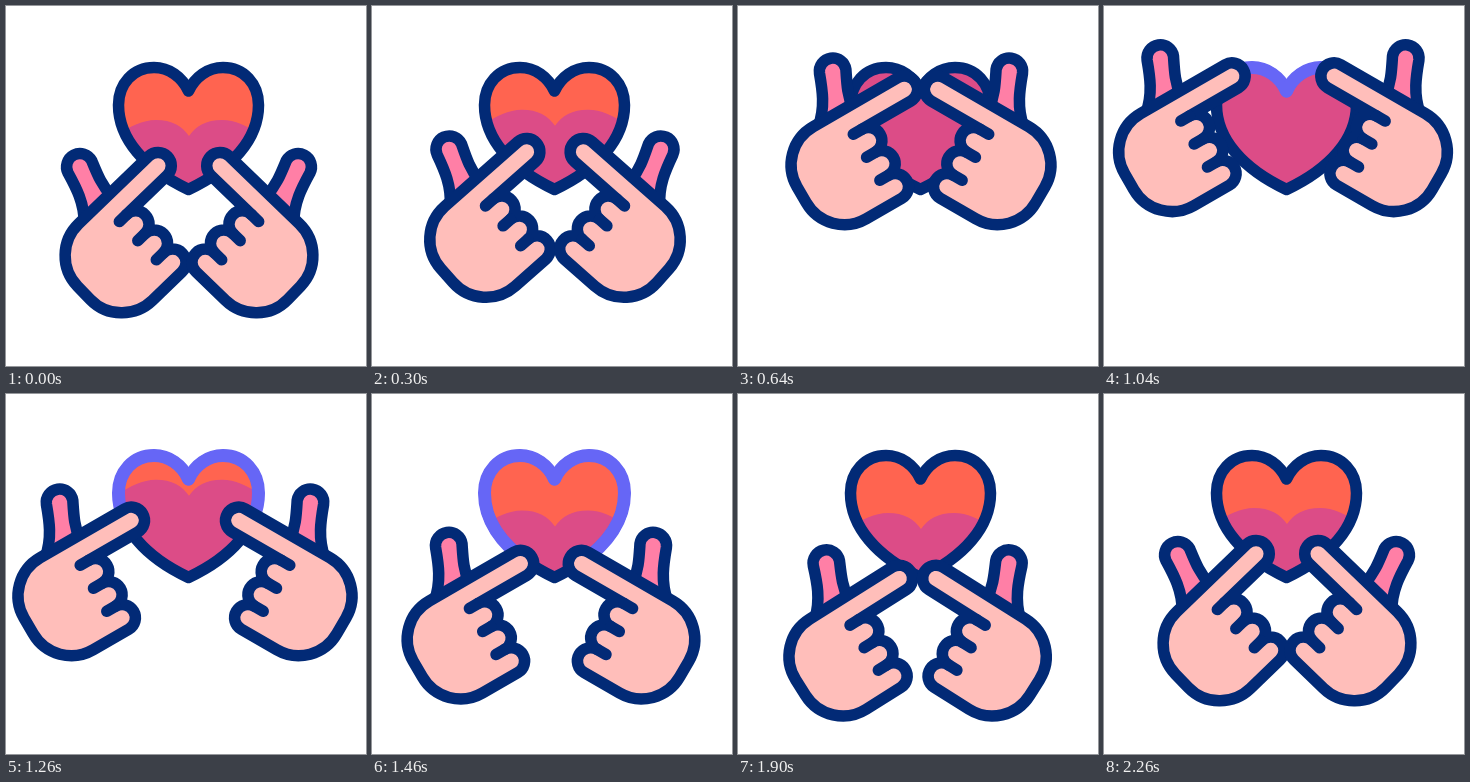
An HTML page for the animation above (2.42 s loop, 360 by 360 pixels).

```html
<!DOCTYPE html>
<html lang="en">
<head>
<meta charset="utf-8">
<title>Finger heart</title>
<style>
  html, body { margin: 0; width: 100%; height: 100%; overflow: hidden; background: #fff; }
  svg { display: block; width: 100vw; height: 100vh; }
  .line { stroke: #022a76; stroke-width: 11.5; stroke-linecap: round; stroke-linejoin: round; }
  .trace { fill: none; stroke: #6666f6; stroke-width: 13; stroke-linecap: round; }
</style>
</head>
<body>
<svg viewBox="0 0 360 360">
  <defs>
    <path id="heart" d="M182.5 85C176 71 163 61.5 148 61.5C127 61.5 112.5 78 112.5 99C112.5 133 139 163 182.5 183.5C226 163 252.5 133 252.5 99C252.5 78 238 61.5 217 61.5C202 61.5 189 71 182.5 85Z"/>
    <clipPath id="inside"><use href="#heart"/></clipPath>
    <path id="half" pathLength="1" d="M182.5 85C176 71 163 61.5 148 61.5C127 61.5 112.5 78 112.5 99C112.5 133 139 163 182.5 183.5"/>
    <!-- Route of the left fingertip along the heart -->
    <path id="route" d="M166.3 83.4C150 62 120 55 120 96C120 130 140 160 163 189"/>
    <!-- Left hand; the centre of the fingertip is the origin -->
    <g id="hand" class="line">
      <path id="thumb" fill="#ff7fa6" d="M-86 37C-79 18 -82 0 -84.8 -16A13.3 13.3 0 0 1 -58.4 -20C-57.5 -6 -57 7 -51 20L-68 42Z"/>
      <g transform="rotate(-30)">
        <path fill="#ffbeba" d="M0 -13.3H-97.6a44 44 0 0 0 -44 44V49.1a44 44 0 0 0 44 44H-56.6a13.3 13.3 0 0 0 0 -26.6a13.3 13.3 0 0 0 0 -26.6a13.3 13.3 0 0 0 0 -26.6H0a13.3 13.3 0 0 0 0 -26.6Z"/>
        <path d="M-56.6 13.3h-10m10 26.6h-10m10 26.6h-10"/>
      </g>
    </g>
  </defs>

  <use href="#heart" fill="#ff6450"/>
  <g clip-path="url(#inside)">
    <path id="wave" fill="#dc4c87" d="M100 135C118 125 132 114 150 114C166 114 176 120 183 130C190 120 200 114 216 114C234 114 248 125 266 135V300H100Z"/>
  </g>
  <use href="#heart" class="line" fill="none"/>
  <g id="trace" class="trace">
    <use href="#half"/>
    <use href="#half" transform="translate(365) scale(-1 1)"/>
  </g>
  <use id="left" href="#hand"/>
  <g id="mirror"><use id="right" href="#hand"/></g>
</svg>

<script>
const LOOP = 2420;
const rest = { x: 152, y: 159.7, angle: -14 };

const $ = id => document.getElementById(id);
const set = (id, name, value) => $(id).setAttribute(name, value);
const mix = (a, b, u) => a + (b - a) * u;
const clamp = u => Math.min(1, Math.max(0, u));

// Gently eased progress from time a to time b
function phase(t, a, b) {
  const u = clamp((t - a) / (b - a));
  return mix(u, u * u * (3 - 2 * u), .5);
}

const route = $('route');
const routeLength = route.getTotalLength();

function render(t) {
  const rise = phase(t, 200, 640);
  const trace = phase(t, 800, 1610);
  const drain = phase(t, 1060, 1500);
  const back = phase(t, 1810, 2260);

  const away = rise - back;
  const tip = route.getPointAtLength(trace * routeLength);
  const angle = rest.angle * (1 - away);
  const place = `translate(${mix(rest.x, tip.x, away)} ${mix(rest.y, tip.y, away)}) rotate(${angle})`;
  set('left', 'transform', place);
  set('right', 'transform', place);
  set('thumb', 'transform', `rotate(${angle * .35} -71 34)`);

  const axis = mix(183, 179, clamp(trace * 4) - back);
  set('mirror', 'transform', `translate(${2 * axis}) scale(-1 1)`);
  set('wave', 'transform', `translate(0 ${62 * drain - 56 * rise - 6 * back})`);

  set('trace', 'stroke-dasharray', `${trace} 2`);
  set('trace', 'opacity', trace > 0 ? clamp((1885 - t) / 80) : 0);
}

const start = performance.now();
function tick() {
  render((performance.now() - start) % LOOP);
  requestAnimationFrame(tick);
}
tick();
</script>
</body>
</html>
```
